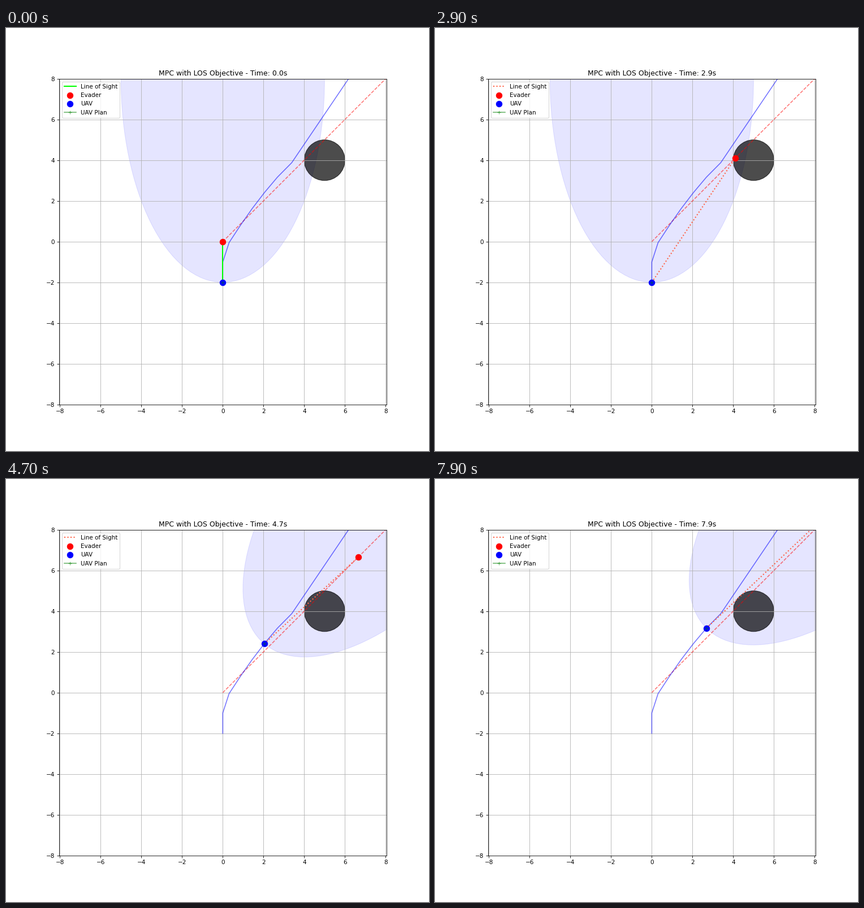
Recreate the animation shown at these times as a matplotlib script. Size 748 by 748 pixels, loop 8000 ms.

```python
import numpy as np
import matplotlib.pyplot as plt
from matplotlib.animation import FuncAnimation
from matplotlib.patches import Circle, Ellipse

FRAMES, STEP = 80, 0.1
SPEED = 2.0                                  # evader, along the diagonal
OBSTACLE, RADIUS = np.array([5.0, 4.0]), 1.0
SIGHT_LENGTH, SIGHT_WIDTH = 20, 10
MOVE_TIMES = np.array([43, 44, 45, 46, 47, 57])

# Every UAV move covers one unit along its current heading.
headings = np.array([90, 72, 56.7, 55, 52.6, 49.9, 45.3, 42.7] + [41.5] * 8)


def unit(deg):
    a = np.radians(deg)
    return np.stack([np.cos(a), np.sin(a)], axis=-1)


route = np.vstack([[0, -2], [0, -2] + np.cumsum(unit(headings), axis=0)])
path = np.vstack([route[:8], route[7] + 7 * unit(55.9)])
path = np.delete(path, 8, axis=0) if len(path) > 9 else path


def uav_index(i):
    return int(np.sum(MOVE_TIMES <= i))


def blocked(a, b):
    d = b - a
    s = np.clip(np.dot(OBSTACLE - a, d) / np.dot(d, d), 0, 1)
    return np.linalg.norm(a + s * d - OBSTACLE) < RADIUS


fig, ax = plt.subplots(figsize=(10, 10), dpi=74.8)
ax.set_ylim(-8, 8)
half = 8 * (0.9 - 0.125) / (0.88 - 0.11)     # equal scale on both axes
ax.set_xlim(-half, half)
ax.grid(True)

cone = ax.add_patch(Ellipse((0, 8), SIGHT_LENGTH, SIGHT_WIDTH, angle=90,
                            color="blue", alpha=0.1))
ax.add_patch(Circle(OBSTACLE, RADIUS, color="black", alpha=0.7))
ax.plot([0, 12], [0, 12], "r--", alpha=0.55)
ax.plot(*path.T, "b-", alpha=0.55)
sight, = ax.plot([], [], lw=2, label="Line of Sight")
evader, = ax.plot([], [], "ro", ms=10, label="Evader")
uav, = ax.plot([], [], "bo", ms=10, label="UAV")
plan, = ax.plot([], [], "g+-", alpha=0.6, label="UAV Plan")
title = ax.set_title("")


def update(i):
    t = i * STEP
    k = uav_index(i)
    pos = route[k]
    target = SPEED * t * unit(45)

    cone.set_center(pos + SIGHT_LENGTH / 2 * unit(headings[k]))
    cone.set_angle(headings[k])

    sight.set_data(*np.array([pos, target]).T)
    hidden = blocked(pos, target)
    sight.set_color("tomato" if hidden else "lime")
    sight.set_linestyle(":" if hidden else "-")

    evader.set_data([target[0]], [target[1]])
    uav.set_data([pos[0]], [pos[1]])

    # Without a solution the plan collapses onto the UAV.
    solved = uav_index(i + 1) > k
    plan.set_data(*(route[k:] if solved else route[k:k + 1]).T)

    title.set_text(f"MPC with LOS Objective - Time: {t:.1f}s")
    ax.legend(loc="upper left")
    return cone, sight, evader, uav, plan, title


anim = FuncAnimation(fig, update, frames=FRAMES, init_func=lambda: update(0),
                     interval=100, repeat=True, repeat_delay=0, blit=False)
plt.show()
```
